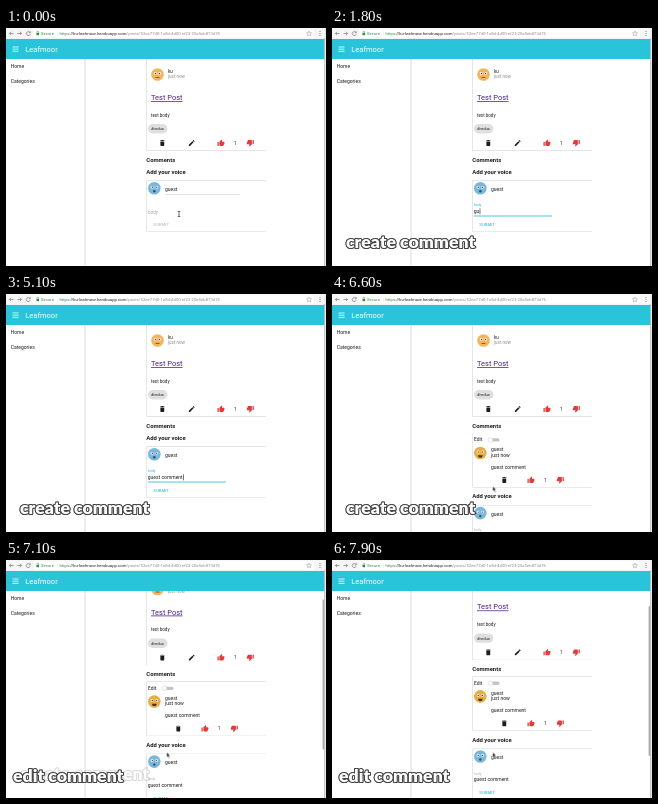
An HTML page that plays this animation: 320 by 238 pixels, repeating every 8000 ms.

```html
<!DOCTYPE html>
<html lang="en">
<head>
<meta charset="utf-8">
<title>Leafmoor</title>
<style>
html, body { margin: 0; width: 100%; height: 100%; overflow: hidden; background: #fff; }
svg { display: block; width: 320px; height: 238px; font-family: Roboto, Arial, sans-serif; font-size: 5px; fill: #1c1c1c; }
.bar { font-size: 4.25px; }
.muted { fill: #8c8c8c; }
.head { font-size: 5.9px; font-weight: 700; }
.small { font-size: 4.5px; }
.card { fill: #fff; filter: drop-shadow(0 .5px .7px #0006); }
.red { fill: #e23b3b; }
.caption { font: 900 17.7px Lato, "Open Sans", sans-serif; fill: #fff; stroke: #444; stroke-width: 2px; stroke-linejoin: round; paint-order: stroke; filter: drop-shadow(.6px .8px .6px #0009); }

.scroll, .form, .comment, .label, .line, .hover, .submit, .beam, .arrow, .thumb, .caption { animation: 8s linear infinite both; }
.scroll { animation-name: scroll; }
.form { animation-name: push; animation-timing-function: step-end; }
.comment { animation-name: appear; animation-timing-function: step-end; }
.label { animation-name: float; transform-origin: 142px 185.5px; }
.line { animation-name: grow; transform-origin: 181px 188px; }
.hover { animation-name: unhover; }
.submit { animation-name: enable; }
.beam { animation-name: beam; animation-timing-function: step-end; }
.arrow { animation-name: point; }
.thumb { animation-name: thumb; }
.create { animation-name: create; }
.edit { animation-name: edit; }

@keyframes scroll {
  0%, 83.75% { transform: none; }
  86.25% { transform: translateY(-9.5px); }
  89.4% { transform: translateY(-19.5px); }
  92%, 100% { transform: translateY(-22.6px); }
}
@keyframes push { 0% { transform: none; } 76.25%, 100% { transform: translateY(58.8px); } }
@keyframes appear { 0% { visibility: hidden; } 76.25%, 100% { visibility: visible; } }
@keyframes float {
  0%, 4.5% { transform: none; fill: #aaa; animation-timing-function: ease-out; }
  10%, 73.5% { transform: translateY(-7.2px) scale(.75); fill: #20bcd4; }
  76%, 100% { transform: translateY(-7.2px) scale(.75); fill: #b4b4b4; }
}
@keyframes grow {
  0%, 4.5% { transform: scaleX(0); animation-timing-function: ease-out; }
  10%, 73.5% { transform: none; }
  76%, 100% { transform: scaleX(0); }
}
@keyframes unhover { 0%, 3% { opacity: 1; } 8%, 100% { opacity: 0; } }
@keyframes enable { 0%, 18.7% { fill: #b8b8b8; } 20.5%, 100% { fill: #20bcd4; } }
@keyframes beam { 0% { visibility: visible; } 18.75%, 100% { visibility: hidden; } }
@keyframes point {
  0%, 68.7% { opacity: 0; transform: translate(172px, 185px); }
  68.75% { opacity: 1; transform: translate(172px, 185px); animation-timing-function: ease-in-out; }
  73%, 100% { opacity: 1; transform: translate(160.7px, 192.5px); }
}
@keyframes thumb {
  0%, 84% { opacity: 0; transform: none; }
  85% { opacity: 1; transform: none; }
  92%, 100% { opacity: 1; transform: translateY(14px); }
}
@keyframes create { 0%, 1.25% { opacity: 0; } 7.5%, 85.5% { opacity: 1; } 89.5%, 100% { opacity: 0; } }
@keyframes edit { 0%, 84% { opacity: 0; } 87%, 100% { opacity: 1; } }
</style>
</head>
<body>
<svg viewBox="0 0 320 238">
  <defs>
    <path id="trash" transform="scale(.32) translate(-12 -12)" d="M6 19c0 1.1.9 2 2 2h8c1.1 0 2-.9 2-2V7H6zM19 4h-3.5l-1-1h-5l-1 1H5v2h14z"/>
    <path id="pencil" transform="scale(.32) translate(-12 -12)" d="M3 17.2V21h3.8L17.8 9.9l-3.7-3.7zM20.7 7a1 1 0 0 0 0-1.4l-2.3-2.3a1 1 0 0 0-1.4 0l-1.9 1.8 3.8 3.8z"/>
    <path id="up" transform="scale(.32) translate(-12 -12)" d="M1 21h4V9H1zM23 10c0-1.1-.9-2-2-2h-6.3l1-4.6c0-.6-.1-1-.4-1.3L14.2 1 7.6 7.6C7.2 8 7 8.500 7 9v10c0 1.1.9 2 2 2h9c.8 0 1.500-.5 1.800-1.200l3-7.100z"/>
    <g id="votes">
      <use href="#up" class="red"/>
      <text x="13" y="1.700" class="small">1</text>
      <use href="#up" class="red" transform="translate(29.300 0) rotate(180)"/>
    </g>
    <g id="face">
      <circle r="6.300"/>
      <g fill="#fff"><circle cx="-2.200" cy="-1" r="1.400"/><circle cx="2.200" cy="-1" r="1.400"/></g>
      <g fill="#333"><circle cx="-2" cy="-1" r=".7"/><circle cx="2" cy="-1" r=".7"/></g>
    </g>
  </defs>

  <rect width="320" height="238" fill="#fff"/>

  <g class="scroll">
    <rect class="card" x="140.500" y="26" width="119.500" height="96.500"/>
    <use href="#face" x="151.500" y="46.500" fill="#f2b45c"/>
    <path d="M149.500 49.500h4" stroke="#8a5524" stroke-width=".9"/>
    <text x="162" y="45" class="small">ku</text>
    <text x="162" y="50" class="small muted">just now</text>
    <text x="145" y="72" font-size="7.500" fill="#4b2380" text-decoration="underline">Test Post</text>
    <text x="145" y="88.700" class="small">test body</text>
    <rect x="142" y="96" width="19.500" height="9.400" rx="4.700" fill="#dfdfdf"/>
    <text x="145" y="102.300" font-size="4.200">#redux</text>
    <use href="#trash" x="156.300" y="115"/>
    <use href="#pencil" x="185.700" y="115"/>
    <use href="#votes" x="215" y="115"/>
    <text x="140.300" y="133.500" class="head">Comments</text>

    <g class="comment">
      <rect class="card" x="140.500" y="139" width="119.500" height="54.300"/>
      <text x="142" y="147.400">Edit</text>
      <rect x="156.500" y="144.200" width="11" height="3.400" rx="1.700" fill="#c4c4c4"/>
      <circle cx="158.400" cy="145.900" r="2.400" fill="#fafafa" stroke="#ccc" stroke-width=".4"/>
      <use href="#face" x="148.300" y="159" fill="#e9ae42"/>
      <path d="M145.800 161.300h5q-.5 2.500-2.500 2.500t-2.500-2.500" fill="#49311c"/>
      <text x="159" y="157.400">guest</text>
      <text x="159" y="162.700">just now</text>
      <text x="159" y="174.700">guest comment</text>
      <use href="#trash" x="172.300" y="186"/>
      <use href="#votes" x="199" y="186"/>
    </g>

    <g class="form">
      <text x="140.300" y="145.500" class="head">Add your voice</text>
      <rect class="card" x="140.500" y="152.500" width="119.500" height="50.800"/>
      <use href="#face" x="148.300" y="160.300" fill="#79b7dc"/>
      <circle cx="148.300" cy="163.300" r="1.200" fill="#2b4f68"/>
      <text x="159" y="163">guest</text>
      <path class="hover" d="M159 166.400h75" stroke="#ccc" stroke-width=".6"/>
      <text class="label" x="142" y="185.500" font-size="4.600">body</text>
      <text id="typed" x="141.800" y="185.200"></text>
      <rect id="caret" y="180.300" width=".6" height="6"/>
      <rect class="line" x="142" y="187.600" width="78" height=".8" fill="#20bcd4"/>
      <text class="submit" x="147.300" y="198.200" font-size="4.400">SUBMIT</text>
    </g>
  </g>

  <text x="4.700" y="39.700">Home</text>
  <text x="4.700" y="54.700">Categories</text>
  <path d="M79 31v207" stroke="#d2d2d2" stroke-width=".8"/>

  <rect y="10.800" width="318.500" height="20.200" fill="#29c3da"/>
  <path d="M6.500 19h6m-6 2.200h6m-6 2.200h6" stroke="#fff" stroke-width=".8"/>
  <text x="19.300" y="23.800" font-size="7.500" fill="#fff">Leafmoor</text>

  <rect width="320" height="10.800" fill="#f6f6f6"/>
  <g class="bar">
    <rect x="27.500" y="1.300" width="280" height="8.300" rx="1" fill="#fff"/>
    <path d="M7.500 5.500h-4m1.600-1.700-1.700 1.700 1.700 1.700M11.500 5.500h4m-1.600-1.700 1.700 1.700-1.700 1.700M24 4.500a2 2 0 1 0 .2 1.700M24.300 3.300v1.500h-1.500" fill="none" stroke="#777" stroke-width=".7"/>
    <rect x="30.500" y="5" width="2.600" height="2.200" fill="#2d8b45"/>
    <path d="M31 5v-1a.8.8 0 0 1 1.600 0v1" fill="none" stroke="#2d8b45" stroke-width=".5"/>
    <text x="35" y="7" fill="#2d8b45">Secure</text>
    <path d="M51.500 3v5" stroke="#ddd" stroke-width=".4"/>
    <text x="53.500" y="7"><tspan fill="#2d8b45">https</tspan>://ku-leafmoor.herokuapp.com<tspan class="muted">/posts/52ee77d0-1e8d-4d00-ef23-20a5eb873d76</tspan></text>
    <path d="m303 3 .7 1.600 1.800.2-1.300 1.200.3 1.800-1.500-.9-1.500.9.3-1.800-1.300-1.200 1.800-.2z" fill="none" stroke="#777" stroke-width=".4"/>
    <path d="M314 3.500h0m0 2h0m0 2h0" stroke="#666" stroke-width="1" stroke-linecap="round"/>
  </g>
  <rect x="318.500" width="1.500" height="238" fill="#e9e9e9"/>
  <path d="M318.500 10v228" stroke="#aaa" stroke-width=".6"/>
  <rect class="thumb" x="316.600" y="32" width="1.600" height="150" rx=".8" fill="#aaa"/>

  <path class="beam" d="M171.700 183.500h2.600m-1.300 0v5m-1.300 0h2.600" fill="none" stroke="#333" stroke-width=".7"/>
  <path class="arrow" d="M0 0v4.600l1.100-1 .8 1.800.8-.4-.8-1.700h1.500z" stroke="#fff" stroke-width=".3"/>

  <text class="caption create" x="14" y="220.300">create comment</text>
  <text class="caption edit" x="7" y="222">edit comment</text>
</svg>
<script>
const LOOP = 8000, FOCUS = 950, BLUR = 5900;
const phrase = "guest comment";
const keyTimes = [1500, 1700, 2200, 2400, 2600, 3000, 3500, 3700, 3900, 4100, 4300, 4500, 4600];
const typed = document.getElementById("typed");
const caret = document.getElementById("caret");

function draw() {
  const t = performance.now() % LOOP;
  const count = keyTimes.filter(k => k <= t).length;
  // Non-breaking space keeps the trailing gap measurable.
  const text = phrase.slice(0, count).replace(" ", "\u00a0");
  if (typed.textContent !== text) typed.textContent = text;
  caret.setAttribute("x", 142.100 + (count ? typed.getComputedTextLength() : 0));
  caret.style.visibility = t >= FOCUS && t < BLUR ? "visible" : "hidden";
  requestAnimationFrame(draw);
}
draw();
</script>
</body>
</html>
```
